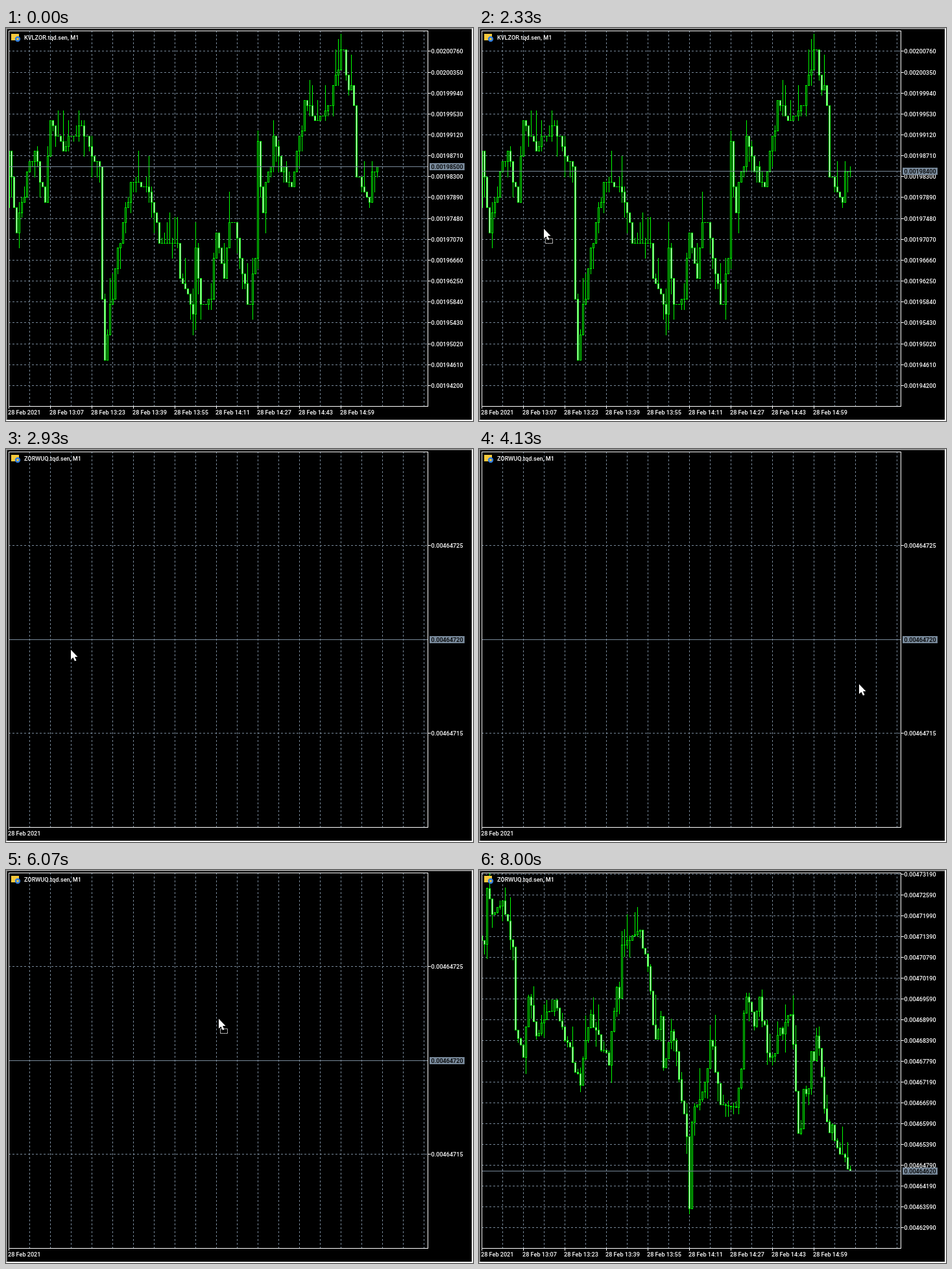
An HTML page with a canvas for the animation above (8790 ms loop, 720x605 px).

```html
<!DOCTYPE html>
<html lang="en">
<head>
<meta charset="utf-8">
<title>Chart symbol switch</title>
<style>
  html, body { margin: 0; width: 100%; height: 100%; overflow: hidden; background: #000; }
  canvas { display: block; }
</style>
</head>
<body>
<canvas id="stage" width="720" height="605"></canvas>
<script>
const ctx = document.getElementById('stage').getContext('2d');
const LOOP = 8790, SLATE = '#778899', LIME = '#00ff00';

const lerp = (a, b, u) => a + (b - a) * u;
const clamp = u => Math.max(0, Math.min(1, u));
const easeOut = u => 1 - (1 - u) ** 2;
const smooth = u => u * u * (3 - 2 * u);

function random(seed) {
  const v = Math.sin(seed * 12.9898) * 43758.5453;
  return v - Math.floor(v);
}

// Turning points [bar, level] become candles: steeper legs scatter more, and
// levels snap to the price step (in pixels).
function makeCandles(turns, base, step, wickSize, seed) {
  const snap = v => Math.round(v / step) * step;
  const candles = [];
  let open = turns[0][1];
  for (let leg = 0; leg < turns.length - 1; leg++) {
    const [i0, a] = turns[leg], [i1, b] = turns[leg + 1];
    for (let i = i0 + 1; i <= i1; i++) {
      const noise = i < i1 ? (random(i + seed) - .5) * .35 * Math.abs(b - a) : 0;
      const close = snap(lerp(a, b, (i - i0) / (i1 - i0)) + noise);
      const up = snap(wickSize * random(i * 2.3 + seed) ** 4);
      const down = snap(wickSize * .6 * random(i * 3.7 + seed) ** 4);
      candles.push({
        open: base + open, close: base + close,
        high: base + Math.min(open, close) - up,
        low: base + Math.max(open, close) + down
      });
      open = close;
    }
  }
  return candles;
}

const STEP = 7.84;
const turnsA = [
  [-1, 8], [0, -3], [3, 13], [7, 1], [10, -3], [14, 7], [16, -9], [21, -3], [27, -8], [35, 0],
  [36, 26], [37, 38], [41, 20], [48, 3], [53, 4], [58, 15], [65, 15], [66, 22], [71, 29], [72, 16],
  [74, 27], [78, 26], [80, 13], [83, 22], [85, 11], [87, 11], [93, 27], [95, 18], [96, -5], [98, 9],
  [102, -6], [107, 3], [109, 4], [114, -13], [119, -9], [124, -12], [128, -23], [133, -12], [134, 2],
  [139, 7], [140, 1], [142, 0]
].map(([i, k]) => [i, k * STEP]);

const turnsB = [
  [-1, 101], [1, 114], [2, 28], [4, 68], [8, 47], [12, 118], [13, 246], [16, 288], [18, 195], [21, 255],
  [28, 200], [33, 265], [38, 331], [42, 222], [49, 300], [55, 115], [61, 92], [67, 260], [69, 225],
  [70, 304], [73, 248], [79, 410], [80, 521], [81, 388], [87, 305], [88, 262], [92, 361], [98, 365],
  [102, 195], [105, 240], [107, 195], [111, 288], [119, 222], [122, 405], [129, 255], [133, 387], [142, 458]
];

const NAME_A = 'KVLZOR.tqd.sen, M1', NAME_B = 'ZORWUQ.tqd.sen, M1';
const CHARTS = {
  first: { name: NAME_A, top: 35.465, gap: 32.147, rows: 17, price: 200760, step: 410,
    candles: makeCandles(turnsA, 213, STEP, 50, 4) },
  empty: { name: NAME_B, top: 148, gap: 289, rows: 2, price: 464725, step: 10 },
  second: { name: NAME_B, top: 6, gap: 32, rows: 18, price: 473190, step: 600,
    candles: makeCandles(turnsB, 0, 1, 50, 9) }
};

function box(color, x, y, w, h) {
  ctx.fillStyle = color;
  ctx.fillRect(x, y, w, h);
}

function text(str, x, y, color = '#fff') {
  ctx.fillStyle = color;
  ctx.fillText(str, x, y);
}

const quote = p => (p / 1e8).toFixed(8);

function line(x1, y1, x2, y2) {
  ctx.beginPath();
  ctx.moveTo(x1, y1);
  ctx.lineTo(x2, y2);
  ctx.stroke();
}

function drawWindow() {
  box('#000', 0, 0, 720, 605);
  box('#a0a0a0', 0, 0, 720, 1);
  box('#696969', 0, 1, 719, 1);
  box('#a0a0a0', 0, 0, 1, 605);
  box('#696969', 1, 1, 1, 603);
  box('#e3e3e3', 718, 1, 1, 603);
  box('#e3e3e3', 1, 603, 718, 1);
  box('#fff', 719, 0, 1, 605);
  box('#fff', 0, 604, 720, 1);
}

function drawCandles(candles, lastY) {
  ctx.save();
  ctx.beginPath();
  ctx.rect(5, 5, 645, 577);
  ctx.clip();
  candles.forEach(({ open, close, high, low }, i) => {
    if (i === candles.length - 1) close = lastY;
    const x = 4 + 4 * i;
    const hi = Math.round(Math.min(high, close));
    const lo = Math.round(Math.max(low, close));
    const top = Math.round(Math.min(open, close));
    const h = Math.round(Math.max(open, close)) - top + 1;
    box(LIME, x, hi, 1, lo - hi + 1);
    box(LIME, x - 1, top, 3, h);
    if (h > 2) box(close > open ? '#fff' : '#000', x, top + 1, 1, h - 2);
  });
  ctx.restore();
}

function drawIcon() {
  box('#f5c93c', 8, 9, 12, 10);
  ctx.beginPath();
  ctx.arc(18, 17, 3, 0, 7);
  ctx.lineWidth = 2.4;
  ctx.strokeStyle = '#2f7de0';
  ctx.stroke();
}

function drawChart(chart, price, priceY) {
  const { name, top, gap, rows, step, candles } = chart;
  const rowY = i => Math.round(top + gap * i);
  ctx.strokeStyle = SLATE;
  ctx.lineWidth = 1;
  ctx.setLineDash([3, 3]);
  for (let x = 36; x < 650; x += 32) line(x + .5, 4, x + .5, 582);
  for (let i = 0; i < rows; i++) line(4, rowY(i) + .5, 650, rowY(i) + .5);
  ctx.setLineDash([]);

  if (candles) drawCandles(candles, priceY);
  box(SLATE, 5, priceY, 645, 1);

  box('#fff', 4, 4, 647, 1);
  box('#fff', 4, 582, 647, 1);
  box('#fff', 4, 4, 1, 579);
  box('#fff', 650, 4, 1, 579);

  for (let i = 0; i < rows; i++) {
    box('#fff', 651, rowY(i), 4, 1);
    text(quote(chart.price - step * i), 655.5, rowY(i) + 4);
  }
  box(SLATE, 653, priceY - 5, 54, 11);
  text(quote(price), 655.5, priceY + 4, '#000');

  for (let i = 0; i < (candles ? 9 : 1); i++) {
    const min = 51 + 16 * i;
    const clock = 12 + Math.floor(min / 60) + ':' + String(min % 60).padStart(2, '0');
    box('#fff', 4 + 64 * i, 583, 1, 3);
    text('28 Feb ' + (i ? clock : '2021'), 3 + 64 * i, 595);
  }
  drawIcon();
  text(name, 28, 18);
}

function drawArrow(x, y, dragging) {
  ctx.save();
  ctx.translate(Math.round(x), Math.round(y));
  if (dragging) {
    box('#000', 1, 14, 14, 10);
    ctx.strokeStyle = '#fff';
    ctx.lineWidth = 1;
    ctx.setLineDash([2, 1]);
    ctx.strokeRect(2.5, 15.5, 11, 7);
    ctx.setLineDash([]);
  }
  const arrow = new Path2D('M0 0V15L3.5 12 6 17.5 8.5 16.5 6 11H10.5Z');
  ctx.strokeStyle = '#000';
  ctx.lineWidth = 1;
  ctx.stroke(arrow);
  ctx.fillStyle = '#fff';
  ctx.fill(arrow);
  ctx.restore();
}

function drawForbidden(x, y) {
  for (const [color, width] of [['#fff', 5], ['#000', 2.5]]) {
    ctx.strokeStyle = color;
    ctx.lineWidth = width;
    ctx.beginPath();
    ctx.arc(x, y, 7.3, 0, 7);
    ctx.moveTo(x - 5, y - 5);
    ctx.lineTo(x + 5, y + 5);
    ctx.stroke();
  }
}

function drawPointer(n) {
  if (n < 27 || n >= 120) return;
  if (n < 47) {
    const u = easeOut(clamp((n - 27) / 8));
    drawArrow(lerp(15, 100, u), lerp(293, 309, u), n < 38);
  } else if (n < 62) {
    const u = smooth(clamp((n - 46) / 11));
    drawArrow(lerp(100, 579, u), lerp(309, 361, u));
  } else if (n < 67) {
    const u = (n - 61) / 5;
    drawArrow(579 + 112 * u ** 1.7, 361 - 4 * u + 8.9 * Math.sin(Math.PI * u) ** 3);
  } else if (n === 83) {
    drawForbidden(720, 306.5);
  } else if (n > 83 && n < 107) {
    const u = easeOut(clamp((n - 83) / 8));
    drawArrow(lerp(714, 328, u), lerp(293, 229, u), n < 98);
  } else if (n >= 107) {
    const u = clamp((n - 114) / 6) ** 1.4;
    drawArrow(lerp(328, 40, u), lerp(230, 640, u));
  }
}

function frame(now) {
  // The screen refreshes 15 times per second.
  const n = Math.floor((now % LOOP + 4) * 0.015);
  ctx.font = '500 9.1px Roboto, "Liberation Sans", sans-serif';
  drawWindow();
  if (n < 15) drawChart(CHARTS.first, 198500, 213);
  else if (n < 38) drawChart(CHARTS.first, 198400, 220);
  else if (n >= 104) drawChart(CHARTS.second, 464620, 463);
  else if (n >= 98) drawChart(CHARTS.second, 464720, 458);
  else if (n >= 44) drawChart(CHARTS.empty, 464720, 293);
  drawPointer(n);
  requestAnimationFrame(frame);
}
requestAnimationFrame(frame);
</script>
</body>
</html>
```
